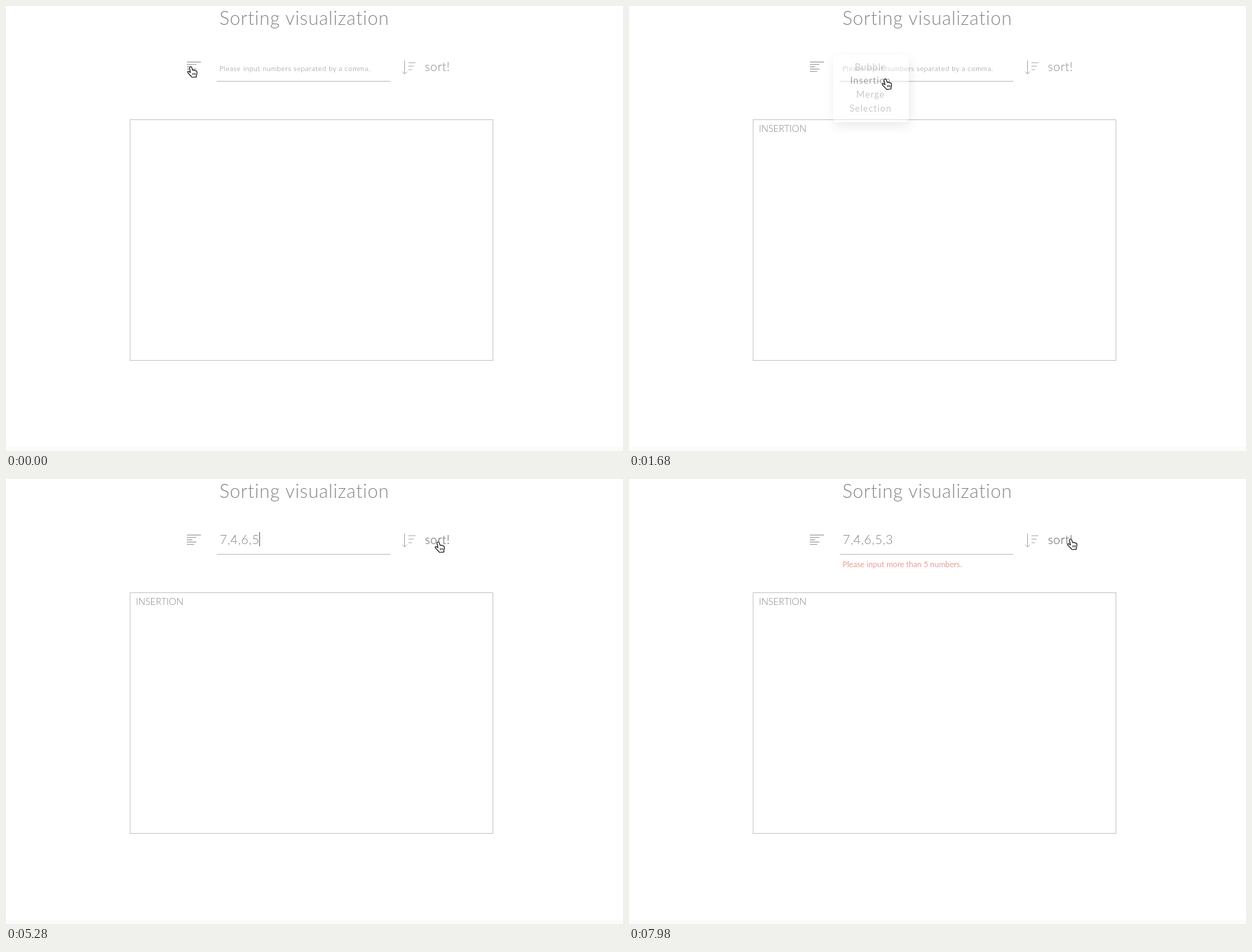
These frames come from a looping animation (880 by 636 pixels, 8000 ms). An HTML page:

```html
<!DOCTYPE html>
<html lang="en">
<head>
<meta charset="utf-8">
<title>Sorting visualization</title>
<style>
  html, body { margin: 0; width: 100%; height: 100%; overflow: hidden; background: #fff; }
  svg { position: absolute; left: 0; top: 0; }
  text, #menu { font-family: Lato, sans-serif; font-weight: 300; fill: #858585; }
  .icon { fill: none; stroke: #a2a2a2; }
  #menu {
    position: absolute; left: 290.5px; top: 70px; width: 108px; height: 95.5px;
    box-sizing: border-box; padding-top: 7.5px; border-radius: 6px;
    background: rgba(255, 255, 255, .84); box-shadow: 2px 6px 16px rgba(0, 0, 0, .17);
    font-size: 13px; font-weight: 400; line-height: 19.8px; letter-spacing: .85px;
    text-align: center; color: #959595;
  }
</style>
</head>
<body>
<svg width="880" height="636">
  <rect y="630" width="880" height="6" fill="#fbfbfb"/>
  <text x="304.5" y="27" font-size="26.5" letter-spacing=".76">Sorting visualization</text>
  <path class="icon" stroke-width="1.2" d="M258 80.2h20M258 83.5h13.5M258 86.8h7.5M258 90.1h13.5M258 93.5h10.5"/>
  <path class="icon" stroke-width=".9" d="M568.5 78v19M565 93.7l3.5 3.5 3.5-3.5M574 81h10M574 86h7.5M574 91h5"/>
  <text id="sort" x="597.5" y="93" font-size="17" letter-spacing=".6">sort!</text>
  <path d="M300.5 107.6H548" stroke="#c8c8c8" stroke-width="1.2"/>
  <text id="hint" x="304.5" y="93" font-size="10" letter-spacing=".5">Please input numbers separated by a comma.</text>
  <text id="value" x="304.8" y="93.3" font-size="18" letter-spacing=".45"></text>
  <rect id="caret" y="76" width="1.2" height="20" fill="#777"/>
  <text id="error" x="304.5" y="126.3" font-size="11.18" style="fill:#e79d95;font-weight:400">Please input more than 5 numbers.</text>
  <rect x="177" y="162.5" width="517.5" height="344" fill="none" stroke="#c8c8c8"/>
  <text id="label" x="185.2" y="180" font-size="13.3">INSERTION</text>
</svg>
<div id="menu">Bubble<br><span id="pick">Insertion</span><br>Merge<br>Selection</div>
<svg id="pointer" width="880" height="636" overflow="visible">
  <g id="hand" fill="#fff" stroke="#222" stroke-width="1.2" stroke-linejoin="round">
    <path d="M-2.8-7C-1.4-7.6-.8-6.6-.4-5.4L.8-2C1.5-2.8 2.6-2.6 3-1.8 3.8-2.4 4.8-2 5-1.2 6-1.6 6.7-.8 6.8.2 7 2 6.8 4 6 5.6V7.4L0 8C-1 6.4-4.2 3.8-6 1.6-7 .4-6-1-4.6-.2L-2.4 1.2-3.8-5C-4-6-3.6-6.7-2.8-7Z"/>
    <path d="M.8 1.8l.3 2.9M2.7 1.7l.2 2.9M4.5 1.6l.1 2.9" stroke-width=".9"/>
  </g>
  <path id="beam" fill="none" stroke="#222" stroke-width="1.4" d="M-3-6.5C-1-6.5 0-6 0-5 0-6 1-6.5 3-6.5M0-5V5M-3 6.5C-1 6.5 0 6 0 5 0 6 1 6.5 3 6.5M-1.5 2.5h3"/>
  <path id="arrow" fill="#111" stroke="#fff" d="M-5-8V5.5l3-2.8 2.2 5 2.4-1L.5 1.8h4.3Z"/>
</svg>
<script>
const $ = id => document.getElementById(id);
const LOOP = 8000, STEP = 60, BLINK = 500;
const OPEN = 600, PICK = 1560, FOCUS = 2820, SUBMIT = 5520, REFOCUS = 6060;

const home = { x: 265.5, y: 94 };
const moves = [
  { start: 720, end: 1140, x: 363.5, y: 113, bow: 0 },
  { start: 1620, end: 1980, x: 418.5, y: 90.5, bow: 0 },
  { start: 4680, end: 5280, x: 618.5, y: 97, bow: 22 },
  { start: 5580, end: 5940, x: 487.5, y: 87, bow: 0 },
  { start: 7560, end: 7980, x: 632, y: 93, bow: 45 }
];

// Short bursts of typing, each at an even pace
const bursts = [
  { start: 3240, gap: 240, text: '7,4' },
  { start: 3840, gap: 180, text: ',6' },
  { start: 4080, gap: 180, text: ',5' },
  { start: 6960, gap: 180, text: ',3' }
];
const keys = bursts.flatMap(b => [...b.text].map((char, i) => ({ char, time: b.start + i * b.gap })));

const ramp = (t, a, b) => Math.min(1, Math.max(0, (t - a) / (b - a)));
const ease = k => k * k * (3 - 2 * k);
const show = (id, on) => $(id).style.display = on ? '' : 'none';
const latest = (t, times) => Math.max(0, ...times.filter(s => s <= t));

function pointerAt(t) {
  let { x, y } = home;
  for (const m of moves) {
    const k = ease(ramp(t, m.start, m.end));
    x += (m.x - x) * k;
    y += (m.y - y) * k + m.bow * Math.sin(Math.PI * k);
  }
  return [x, y];
}

function draw(t) {
  const [x, y] = pointerAt(t);
  const over = (l, top, r, b) => x > l && x < r && y > top && y < b;
  const lastKey = latest(t, keys.map(k => k.time));
  const visible = lastKey <= latest(t, moves.map(m => m.start));

  const menu = ramp(t, OPEN, OPEN + 240) * (1 - ramp(t, PICK, PICK + 240));
  const inMenu = menu > 0 && over(290, 70, 399, 166);
  const onSort = over(594, 75, 640, 106);
  $('menu').style.opacity = menu;
  $('pick').style.color = inMenu && over(290, 98, 399, 118) ? '#4a4a4a' : '';
  $('sort').style.fill = onSort && visible ? '#555' : '';

  const typed = keys.filter(k => k.time <= t).map(k => k.char).join('');
  $('value').textContent = typed;
  show('hint', !typed);
  show('label', t >= PICK);
  show('error', t >= SUBMIT);

  // The blink restarts on focus and on every key
  const focused = t >= FOCUS && t < SUBMIT || t >= REFOCUS;
  const idle = t - Math.max(lastKey, latest(t, [FOCUS, REFOCUS]));
  show('caret', focused && idle % (2 * BLINK) < BLINK);
  $('caret').setAttribute('x', 304.3 + (typed && $('value').getComputedTextLength()));

  const hand = inMenu || onSort || over(254, 74, 282, 112);
  const beam = !hand && over(300, 70, 548, 109);
  show('hand', hand);
  show('beam', beam);
  show('arrow', !hand && !beam);
  show('pointer', visible);
  $('pointer').style.transform = `translate(${x}px, ${y}px)`;
}

function tick() {
  const t = performance.now() % LOOP;
  draw(t - t % STEP);
  requestAnimationFrame(tick);
}
tick();
</script>
</body>
</html>
```
